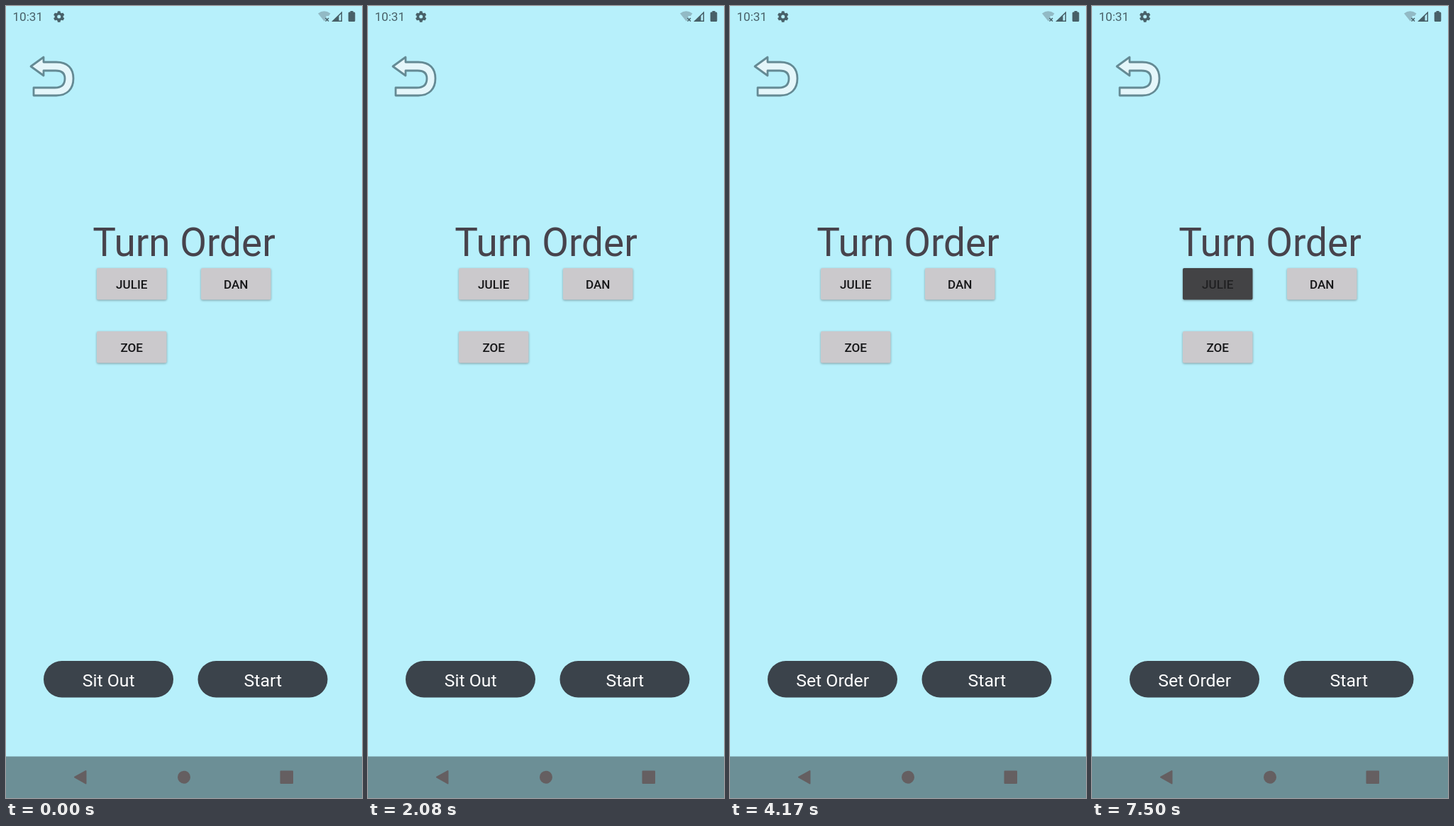
These frames come from a looping animation (502x1115 px, 8000 ms). An HTML page:

```html
<!DOCTYPE html>
<html lang="en">
<head>
<meta charset="utf-8">
<title>Turn Order</title>
<style>
  html, body { margin: 0; width: 100%; height: 100%; overflow: hidden; background: #b7f0fb; }
  svg { display: block; width: 502px; height: 1115px; font-family: Roboto, sans-serif; }
  .mid { text-anchor: middle; }
  .title { font-size: 54.9px; fill: #47434c; }
  .pill text { font-size: 24.8px; fill: #fff; }
  .pill rect { fill: #3b434b; }
  .player { font-size: 17.1px; font-weight: 500; fill: #151517; }
  .player rect { fill: #cbc9cc; filter: drop-shadow(0 1.5px 1.5px #0005); }
  .player.out { fill: #202022; }
  .player.out rect { fill: #434345; }
  .status { fill: #486068; }
  .nav { fill: #655f61; stroke: #655f61; stroke-width: 2; stroke-linejoin: round; }
</style>
</head>
<body>
<svg viewBox="0 0 502 1115">
  <defs>
    <radialGradient id="glow">
      <stop offset="0" stop-color="#e2e2e2" stop-opacity=".9"/>
      <stop offset=".7" stop-color="#c9c9c9" stop-opacity=".85"/>
      <stop offset=".78" stop-color="#bbb" stop-opacity=".35"/>
      <stop offset="1" stop-color="#bbb" stop-opacity="0"/>
    </radialGradient>
    <clipPath id="pillClip"><rect x="53" y="922" width="183" height="51.5" rx="25.75"/></clipPath>
  </defs>
  <rect width="502" height="1115" fill="#b7f0fb"/>

  <g class="status">
    <text x="9.5" y="21.3" font-size="17.1">10:31</text>
    <circle cx="74.7" cy="15" r="4.3" fill="none" stroke="#486068" stroke-width="3.6"/>
    <g id="teeth"></g>
    <path d="M440 10.500Q448.500 4 457.500 10.500L455 14H451.500V18L448.800 21.500Z" fill="#92bac5"/>
    <path d="M450.500 17L455 21.500M455 17L450.500 21.500" stroke="#486068" stroke-width="1.5"/>
    <path fill-rule="evenodd" d="M459 22L474 7.500V22ZM469.500 20.500H472.500V11L469.500 14Z"/>
    <path d="M485.500 8.500V7H489.500V8.500H491Q492.300 8.500 492.300 10V20.500Q492.300 22 491 22H484Q482.700 22 482.700 20.500V10Q482.700 8.500 484 8.500Z"/>
  </g>

  <path d="M35 85L53 72V79H71C87 79 95 88 95 102C95 117 86 126 71 126H39V115H69C79 115 83 110 83 102C83 95 79 91 70 91H53V98Z"
    fill="#e5f6fa" stroke="#648a94" stroke-width="2.800" stroke-linejoin="round"/>

  <text class="title mid" x="251" y="351.500">Turn Order</text>
  <g id="players"></g>

  <g class="pill mid">
    <rect x="53" y="922" width="183" height="51.5" rx="25.75"/>
    <circle id="ripple" fill="#fff" clip-path="url(#pillClip)"/>
    <text id="mode" x="144.700" y="957.500"></text>
    <rect x="270.500" y="922" width="183" height="51.5" rx="25.75"/>
    <text x="362.300" y="957.500">Start</text>
  </g>

  <rect y="1056.500" width="502" height="58.500" fill="#6c8f96"/>
  <g class="nav">
    <path d="M97 1085.700L112.500 1077V1094.500Z"/>
    <circle cx="251" cy="1085.700" r="8"/>
    <rect x="387.500" y="1077.500" width="16.500" height="16.500"/>
  </g>

  <circle id="touch" r="17" fill="url(#glow)"/>
</svg>
<script>
const $ = id => document.getElementById(id);
const set = (el, attrs) => { for (const k in attrs) el.setAttribute(k, attrs[k]); };

$('teeth').innerHTML = [0, 60, 120, 180, 240, 300].map(a =>
  `<rect x="72.700" y="7.300" width="4" height="3" rx=".6" transform="rotate(${a} 74.700 15)"/>`).join('');

$('players').innerHTML = [['JULIE', 128, 369], ['DAN', 275, 369], ['ZOE', 128, 458]].map(([name, x, y]) =>
  `<g class="player mid"><rect x="${x}" y="${y}" width="98.500" height="44.500" rx="2"/>
   <text x="${x + 49.2}" y="${y + 28.8}">${name}</text></g>`).join('');

const firstPlayer = $('players').firstElementChild;

// start time, centre x, radius, opacity
const ripples = [
  [0, 0, 0, 0],
  [3750, 152.5, 55, .17],
  [3833, 148, 65, .17],
  [4000, 146, 85, .12],
  [4083, 146, 85, .05],
  [4167, 0, 0, 0]
];

function draw(now) {
  const t = now % 8000 + 4;
  const within = (a, b) => t >= a && t < b;

  const [, cx, r, opacity] = ripples.findLast(s => t >= s[0]);
  set($('ripple'), { cx, cy: 953, r, opacity });
  $('mode').textContent = t < 4000 ? 'Sit Out' : 'Set Order';
  firstPlayer.classList.toggle('out', t >= 6250);

  const onPill = within(3750, 4000), onPlayer = within(6167, 6333);
  set($('touch'), {
    cx: onPill ? 152.5 : 167.5,
    cy: onPill ? 956 : 400,
    opacity: onPill || onPlayer ? 1 : 0
  });
}

const start = performance.now();
function tick() {
  draw(performance.now() - start);
  requestAnimationFrame(tick);
}
tick();
</script>
</body>
</html>
```
